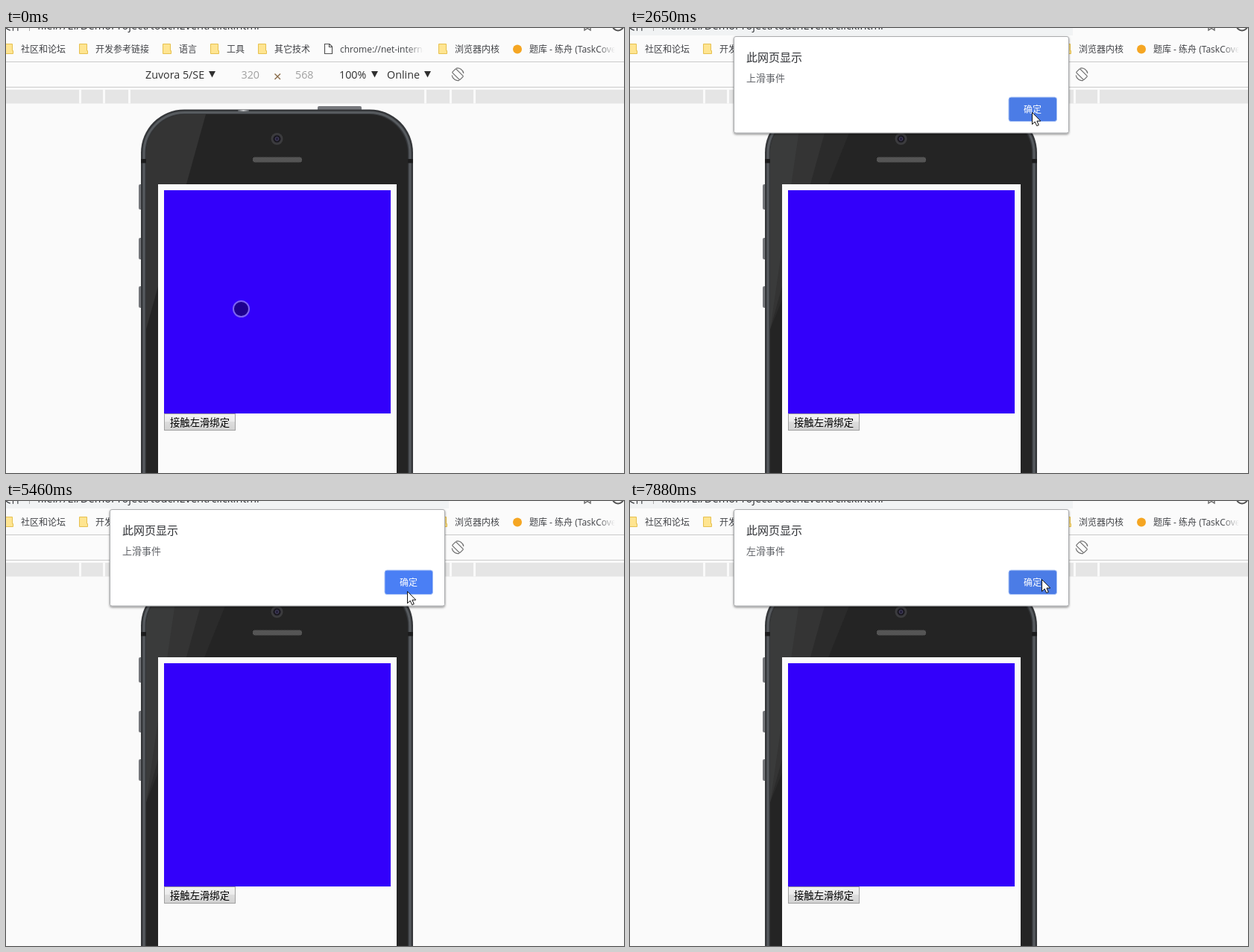
Write an HTML page that moves like this. It is 829x598 px and loops after 8000 ms.

```html
<!DOCTYPE html>
<html lang="zh-CN">
<head>
<meta charset="utf-8">
<title>Touch events</title>
<style>
  html, body { margin: 0; width: 100%; height: 100%; overflow: hidden; background: #fafafa; }
  svg { display: block; width: 829px; height: 598px; }
  text { font-family: "Open Sans", "Noto Sans CJK SC", "Noto Sans CJK", sans-serif; white-space: pre; }
  .mark { font-size: 12px; fill: #404246; }
  .tool { font-size: 14.3px; fill: #303030; }
  .dim { fill: #a0a0a0; }
</style>
</head>
<body>
<svg viewBox="0 0 829 598">
  <defs>
    <linearGradient id="fade">
      <stop stop-color="#fbfbfb" stop-opacity="0"/><stop offset=".55" stop-color="#fbfbfb"/>
    </linearGradient>
    <linearGradient id="btn" x2="0" y2="1">
      <stop stop-color="#f3f3f3"/><stop offset=".48" stop-color="#ebebeb"/>
      <stop offset=".5" stop-color="#ddd"/><stop offset="1" stop-color="#d2d2d2"/>
    </linearGradient>
    <linearGradient id="jack">
      <stop stop-color="#55585c"/><stop offset=".5" stop-color="#c4c6c8"/><stop offset="1" stop-color="#55585c"/>
    </linearGradient>
    <pattern id="mesh" width="2" height="2" patternUnits="userSpaceOnUse">
      <path fill="#333" d="M0 0h2v2h-2z"/><path fill="#777" d="M0 0h1v1h-1zM1 1h1v1h-1z"/>
    </pattern>
    <clipPath id="face"><rect x="188" y="116" width="351" height="600" rx="52"/></clipPath>
    <filter id="shadow" x="-5%" y="-10%" width="110%" height="125%">
      <feDropShadow dx="0" dy="1.5" stdDeviation="1.6" flood-color="#000" flood-opacity=".45"/>
    </filter>
  </defs>

  <rect width="829" height="598" fill="#fafafa"/>
  <rect width="829" height="80" fill="#fbfbfb"/>
  <rect id="strip" width="594" height="10" fill="#f1f3f4"/>
  <g font-size="14.6" fill="#303236">
    <text x="-8" y="2">文件</text>
    <text x="42" y="1.5">file:///E:/DemoProject/touchEvent/click.html</text>
  </g>
  <path d="M31.5 0V4" stroke="#aaa"/>
  <path d="M776 0V3L780 .5L784 3V0" fill="none" stroke="#666" stroke-width="1.4"/>
  <circle cx="821" cy="-4" r="7.5" fill="none" stroke="#555" stroke-width="2"/>
  <g id="marks"></g>
  <path d="M0 45.5H829M0 79.5H829" stroke="#cacaca"/>

  <g class="tool">
    <text x="187" y="68">Zuvora 5/SE</text>
    <text x="315.5" y="68" class="dim">320</text>
    <text x="388" y="68" class="dim">568</text>
    <text x="447" y="68">100%</text>
    <text x="511" y="68">Online</text>
  </g>
  <path d="M360.5 61.5l7.5 7.5m0-7.500l-7.500 7.500" stroke="#8a6d4a" stroke-width="1.4"/>
  <path d="M272 58h9l-4.500 8.500zM490 58h9l-4.500 8.500zM561 58h9l-4.500 8.500z" fill="#303030"/>
  <g fill="none" stroke="#6e6e6e" stroke-width="1.2">
    <rect x="602.5" y="55" width="7" height="14.5" rx="1" transform="rotate(-45 606 62.25)"/>
    <path d="M604 54.2A8 8 0 0 1 613.800 61M608 70.300A8 8 0 0 1 598.200 63.500"/>
  </g>
  <g id="ruler"></g>

  <g fill="#75777b">
    <rect x="178" y="210" width="6" height="34" rx="2"/>
    <rect x="178" y="282" width="6" height="29" rx="2"/>
    <rect x="178" y="347" width="6" height="29" rx="2"/>
    <rect x="418" y="105" width="59" height="8" rx="2"/>
  </g>
  <rect x="181" y="109.5" width="365" height="600" rx="58" fill="#35373a"/>
  <rect x="311" y="110" width="15" height="4" fill="url(#jack)"/>
  <rect x="185" y="113.5" width="357" height="600" rx="54.5" fill="none" stroke="#575b5f" stroke-width="3"/>
  <g clip-path="url(#face)">
    <rect x="188" y="116" width="351" height="482" fill="#242424"/>
    <g id="glare"></g>
  </g>
  <path d="M181 176h7v5.500h-7zM539 176h7v5.500h-7z" fill="#1c1c1d"/>
  <circle cx="363.5" cy="149" r="8" fill="#3c3c3e"/>
  <circle cx="363.5" cy="149" r="4.8" fill="#17161c" stroke="#25232c"/>
  <circle cx="363.5" cy="149" r="2.4" fill="#231f38" stroke="#4a4564"/>
  <rect x="331" y="173.5" width="66" height="7" rx="3" fill="url(#mesh)"/>

  <rect x="204" y="210" width="320" height="388" fill="#fbfbfb"/>
  <rect x="212" y="218" width="304" height="300" fill="#3300fa"/>
  <rect x="212.5" y="518.5" width="95" height="22" fill="url(#btn)" stroke="#a0a0a0"/>
  <text x="220" y="535" font-size="13.33">接触左滑绑定</text>

  <g id="dialog">
    <rect x="139.500" y="11.5" width="449" height="129.5" rx="2.5" fill="#fff" stroke="#a9abad" filter="url(#shadow)"/>
    <text x="156" y="45" font-size="15" fill="#303236">此网页显示</text>
    <text id="message" x="156" y="72" font-size="13" fill="#606368"></text>
    <rect id="ok" x="508" y="93" width="64.5" height="32.5" rx="3" stroke="#a9c3f5"/>
    <text x="528" y="114" font-size="12" font-weight="500" fill="#fff">确定</text>
  </g>
  <circle id="touch" r="10.5" fill="#1e008f" stroke="#7d63f2" stroke-width="2"/>
  <path id="arrow" d="M.5 .5V16.5L4.200 13L6.700 18.500L9.300 17.400L6.900 12H11.800Z" fill="#fff" stroke="#111"/>
</svg>
<script>
const $ = id => document.getElementById(id);
const show = (id, on) => $(id).style.display = on ? "" : "none";
const rect = (x, y, w, h, fill) => `<rect x="${x}" y="${y}" width="${w}" height="${h}" fill="${fill}"/>`;
const LOOP = 8000, STEP = 130;

// Bookmarks follow one another, spaced by the width of their names
const icons = {
  folder: x => `<path d="M${x - 1.5} 21.5h10v9h1v4h-11z" fill="#ffe591" stroke="#e6c04f"/>`,
  page: x => `<path d="M${x - .5} 21.5h6.500l3.500 3.500v9.500h-10zm6 0v4h4" fill="#fff" stroke="#555" stroke-width="1.2"/>`,
  dot: x => `<circle cx="${x + 4}" cy="28.5" r="6" fill="#f5a623"/>`
};
let left = 0;
function bookmark(name, icon = "folder", room = 0) {
  const x = left, width = room || name.length * 12;
  left += width + 40;
  const cover = room ? rect(x + width - 4, 18, 40, 20, "url(#fade)") : "";
  return icons[icon](x) + `<text class="mark" x="${x + 20}" y="33">${name}</text>` + cover;
}
$("marks").innerHTML =
  ["社区和论坛", "开发参考链接", "语言", "工具", "其它技术"].map(s => bookmark(s)).join("") +
  bookmark("chrome://net-internals", "page", 114) + bookmark("浏览器内核") +
  bookmark("题库 - 练舟 (TaskCove)", "dot", 117);

// Width presets sit evenly on both sides of the phone
const presets = [198.5, 232.5, 264.5];
$("ruler").innerHTML = rect(0, 83, 829, 18.5, "#e5e5e5") +
  presets.flatMap(d => [364 - d, 364 + d]).map(x => rect(x - 1.5, 83, 3, 18.5, "#fafafa")).join("");

// Reflections fan out from one point on the left bezel
const ray = (x, fill, id = "") => `<path id="${id}" d="M180 116H${x}L188 405H180Z" fill="${fill}"/>`;
$("glare").innerHTML = ray(304, "#2b2b2b", "wide") + ray(268, "#343434", "mid") + ray(230, "#3a3b3b", "near");

// Where the pointer turns or rests: time, x, y
const stops = [
  [0, 315.5, 377.5], [260, 312.5, 385], [1040, 329.5, 443.5],
  [1690, 358, 309], [2340, 540, 117], [2600, 539, 113], [3380, 539, 110],
  [4420, 378.5, 404.5], [4940, 390, 260], [5460, 538, 121], [5720, 538, 117],
  [6240, 403.5, 304.5], [6500, 400, 304], [7150, 265, 320], [7540, 548, 115], [7800, 552, 105]
];
const alerts = [[1690, 2990, "上滑事件"], [4940, 5720, "上滑事件"], [7150, LOOP, "左滑事件"]];
const ease = k => k * k * (3 - 2 * k);

function pointer(t) {
  const i = stops.findIndex(s => s[0] > t);
  if (i < 0) return stops[stops.length - 1].slice(1);
  const [t0, x0, y0] = stops[i - 1], [t1, x1, y1] = stops[i];
  const k = ease((t - t0) / (t1 - t0));
  return [x0 + (x1 - x0) * k, y0 + (y1 - y0) * k];
}

function draw(time) {
  const t = Math.floor((time + 20) / STEP) * STEP;
  const [x, y] = pointer(t).map(v => Math.round(v * 2) / 2);
  const alert = alerts.find(([from, to]) => t >= from && t < to);
  const touching = !alert && x > 204 && x < 524 && y > 210;
  const hover = x > 508 && x < 572 && y > 93 && y < 120;

  show("dialog", alert);
  if (alert) $("message").textContent = alert[2];
  $("ok").setAttribute("fill", hover ? "#4b7ce6" : "#4a7ff5");
  for (const id of ["strip", "wide", "near"]) show(id, t >= alerts[0][0]);

  show("touch", touching);
  show("arrow", !touching);
  $(touching ? "touch" : "arrow").setAttribute("transform", `translate(${x} ${y})`);
}

const start = performance.now();
function loop() {
  draw((performance.now() - start) % LOOP);
  requestAnimationFrame(loop);
}
loop();
</script>
</body>
</html>
```
